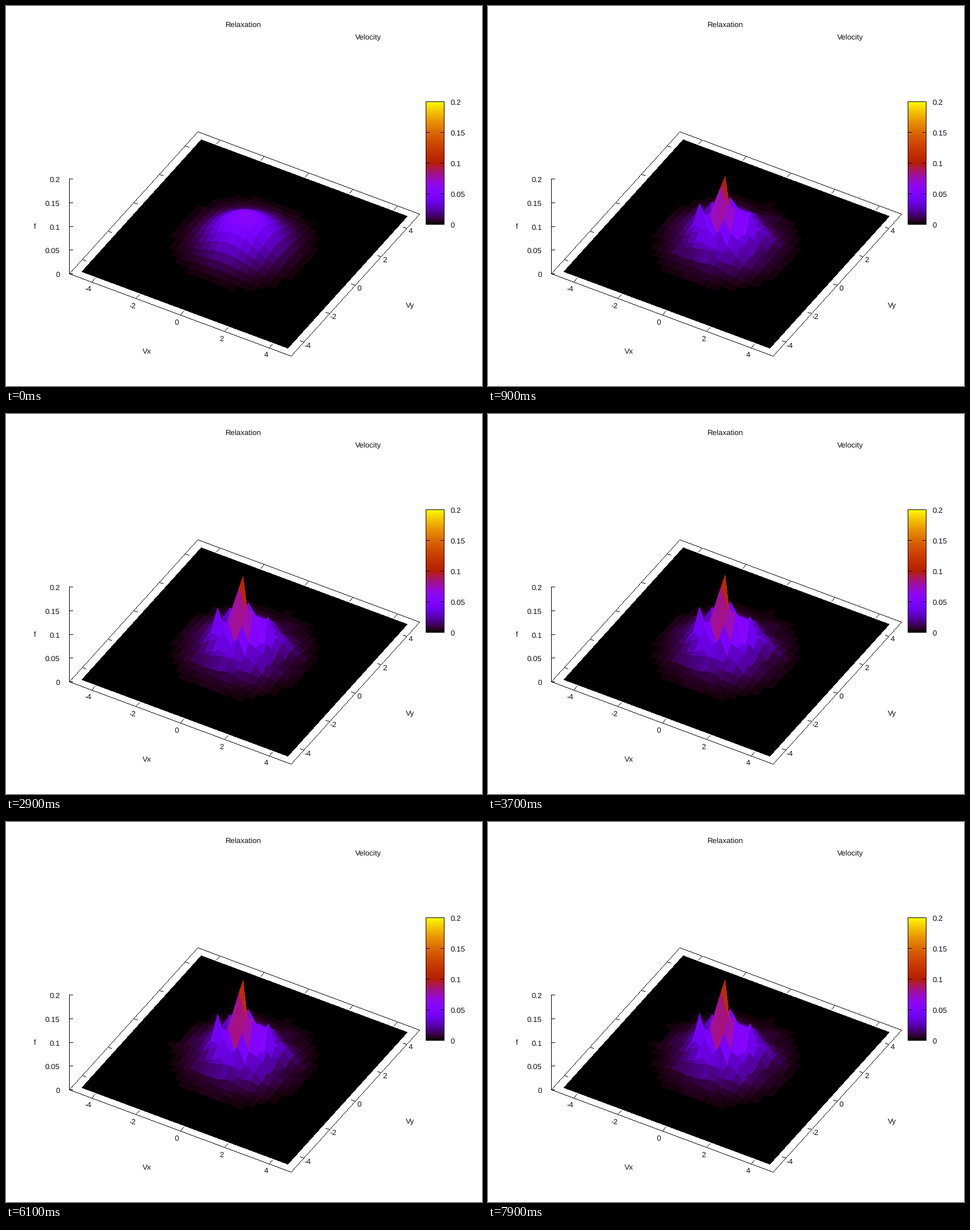
Recreate the animation shown at these times as a matplotlib script. Size 837 px wide and 669 px high, loop 8 s.

```python
import numpy as np
import matplotlib.pyplot as plt
from matplotlib.animation import FuncAnimation
from matplotlib.collections import PolyCollection

W, H, DPI = 837, 669, 96
FRAMES, INTERVAL = 80, 100
plt.rcParams["font.family"] = "Liberation Sans"
plt.rcParams["font.size"] = 10
plt.rcParams["text.hinting"] = "none"

CENTER = np.array([419, 418.5])
EX, EY = np.array([39, 14.5]), np.array([22.6, -25])   # pixels per unit of Vx, Vy
Z_PX = 830                                             # pixels per unit of f
N, STEP = 30, 0.32
LEVELS = 128

fig = plt.figure(figsize=(W / DPI, H / DPI), dpi=DPI, facecolor="white")
ax = fig.add_axes([0, 0, 1, 1])
canvas = np.ones((H, W, 3))      # static layer: axes and colour bar


def palette(v):
    """Black-violet-red-yellow map of f in 0..0.2, in discrete levels."""
    g = np.clip(np.floor(np.asarray(v) / 0.2 * LEVELS) / LEVELS, 0, 1)
    blue = np.clip(np.sin(2 * np.pi * g), 0, 1)
    return np.stack([np.sqrt(g), g ** 3, blue], axis=-1)


def base(x, y):
    return CENTER + x * EX + y * EY


def line(p, q):
    """One pixel wide line without smoothing."""
    p, q = np.round(p), np.round(q)
    n = int(np.abs(q - p).max()) + 1
    x = np.round(np.linspace(p[0], q[0], n)).astype(int)
    y = np.round(np.linspace(p[1], q[1], n)).astype(int)
    canvas[y, x] = 0


def outline(*pts):
    for p, q in zip(pts, pts[1:] + pts[:1]):
        line(p, q)


def label(x, y, s, ha="center"):
    ax.text(x, y, s, ha=ha, va="baseline", color="#111111")


def draw_floor_axes():
    outline(*[base(x, y) for x, y in [(-5, -5), (5, -5), (5, 5), (-5, 5)]])
    dx, dy = 0.17 * EX, 0.26 * EY
    for k, v in enumerate(range(-4, 5, 2)):
        for p, d in [(base(v, -5), dy), (base(v, 5), -dy),
                     (base(5, v), -dx), (base(-5, v), dx)]:
            line(p, p + d)
        label(143.5 + 78.3 * k, 502 + 29 * k, str(v))
        label(530 + 45.3 * k, 601 - 50.3 * k, str(v))


def draw_scales():
    rows = np.arange(168, 385)
    canvas[168:385, 738:771] = palette((384 - rows) / 216 * 0.2)[:, None]
    outline((738, 168), (770, 168), (770, 384), (738, 384))
    line((111, 471), (111, 304))
    for k in range(5):
        name = f"{0.05 * k:g}"
        y, bar_y = round(471 - 41.7 * k), 384 - 54 * k
        line((111, y), (117, y))
        line((738, bar_y), (744, bar_y))
        line((764, bar_y), (770, bar_y))
        label(94.5, y + 5, name, "right")
        label(781, bar_y + 5, name, "left")


def draw_titles():
    label(417.5, 36, "Relaxation")
    label(636.5, 59, "Velocity")
    label(247.5, 611, "Vx")
    label(709.5, 531, "Vy")
    label(50, 392, "f")


# Start: smooth dome. End: rough dome with a few sharp peaks.
v = (np.arange(N) - (N - 1) / 2) * STEP
VX, VY = np.meshgrid(v, v, indexing="ij")
R2 = VX ** 2 + VY ** 2
START = 0.062 * np.exp(-R2 / 2.07)

rng = np.random.default_rng(12)
END = 0.064 * np.exp(-R2 / 2.25) * rng.uniform(0.4, 1.35, R2.shape)
TOP = (N // 2 - 1, N // 2)
PEAKS = [(0, 0, 0.1635), (0, -1, 0.146), (1, -1, 0.1), (-1, -1, 0.09),
         (2, -1, 0.1), (-3, -1, 0.084), (-3, 2, 0.053), (-1, 3, 0.066),
         (3, 1, 0.077)]
for a, b, height in PEAKS:
    END[TOP[0] + a, TOP[1] + b] = height

FLOOR = CENTER + VX[..., None] * EX + VY[..., None] * EY
# Facet corners, from back to front
J, I = np.meshgrid(np.arange(N - 2, -1, -1), np.arange(N - 1), indexing="ij")
CI = I.ravel()[:, None] + [0, 1, 1, 0]
CJ = J.ravel()[:, None] + [0, 0, 1, 1]

draw_floor_axes()
draw_scales()
draw_titles()
ax.imshow(canvas, extent=(-0.5, W - 0.5, H - 0.5, -0.5), aspect="auto",
          interpolation="nearest", zorder=0)
surface = PolyCollection([], edgecolors="none", antialiaseds=False, zorder=2)
ax.add_collection(surface)
ax.set_xlim(-0.5, W - 0.5)
ax.set_ylim(H - 0.5, -0.5)
ax.axis("off")


def update(n):
    left = 0.66 * np.exp(-n / 3) + 0.34 * np.exp(-n / 26)
    f = END + (START - END) * left
    pts = FLOOR.copy()
    pts[..., 1] -= Z_PX * f
    surface.set_verts(pts[CI, CJ])
    surface.set_facecolor(palette(f[CI, CJ].mean(axis=1)))
    return [surface]


anim = FuncAnimation(fig, update, frames=FRAMES, interval=INTERVAL,
                     init_func=lambda: update(0), repeat=True,
                     repeat_delay=0, blit=False)
plt.show()
```
